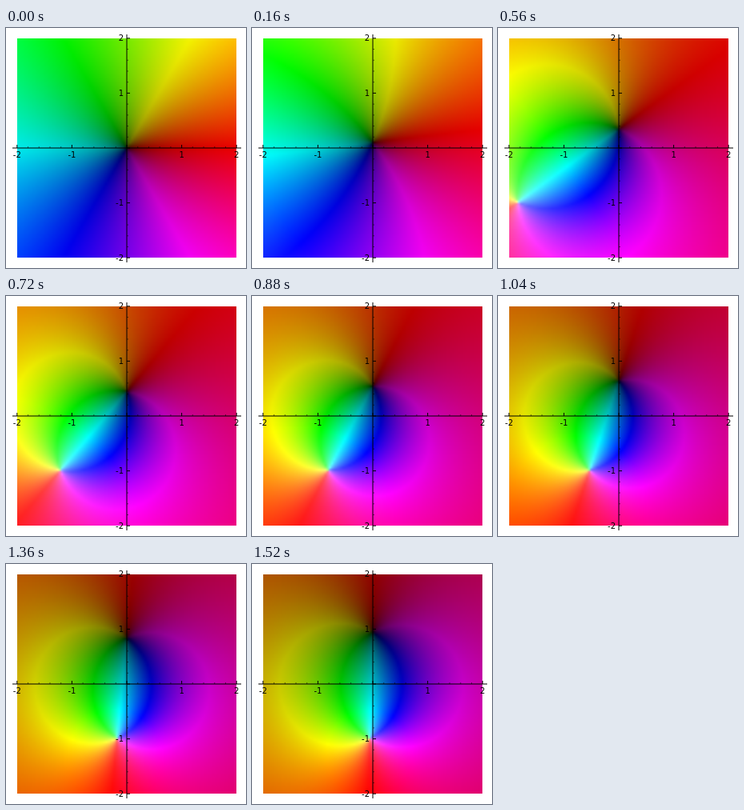
An HTML page with a canvas for the animation above (1.6 s loop, 300 by 300 pixels).

```html
<!DOCTYPE html>
<html lang="en">
<head>
<meta charset="utf-8">
<title>Möbius transformation</title>
<style>
  html, body { margin: 0; overflow: hidden; background: #fff; }
  canvas { display: block; }
</style>
</head>
<body>
<canvas id="stage" width="300" height="300"></canvas>
<script>
const ctx = document.getElementById('stage').getContext('2d');
const CX = 151, CY = 150, UNIT = 68.6;
const STEPS = 20, STEP_MS = 80;

// The function is sampled on a coarse grid and smoothly enlarged.
const GRID = 100;
const plot = document.createElement('canvas');
plot.width = plot.height = GRID;
const plotCtx = plot.getContext('2d');
const image = plotCtx.createImageData(GRID, GRID);

// Domain colouring: the argument gives the hue, the modulus the lightness.
function paintSample(offset, re, im) {
  const r = Math.hypot(re, im);
  const light = Math.atan(Math.log(Math.sqrt(r) + 1)) * 4 / Math.PI - 1;
  const low = Math.max(0, light), high = Math.min(1, 1 + light);
  const hue = Math.atan2(im, re) * 3 / Math.PI + 6;
  for (let c = 0; c < 3; c++) {
    const h = (hue + 6 - 2 * c) % 6;
    const level = Math.min(1, Math.max(0, Math.abs(h - 3) - 1));
    image.data[offset + c] = 255 * (low + level * (high - low));
  }
  image.data[offset + 3] = 255;
}

// f(z) = (z - it) / (tz + 1 - t + it), from the identity to the Cayley map.
function paintMap(t) {
  const coord = i => -2 + 4 * i / (GRID - 1);
  let offset = 0;
  for (let row = 0; row < GRID; row++) {
    const y = -coord(row);
    for (let col = 0; col < GRID; col++, offset += 4) {
      const x = coord(col);
      const a = x, b = y - t;
      const c = t * x + 1 - t, d = t * y + t;
      const n = c * c + d * d + 1e-12;
      paintSample(offset, (a * c + b * d) / n, (b * c - a * d) / n);
    }
  }
  plotCtx.putImageData(image, 0, 0);
  ctx.imageSmoothingQuality = 'high';
  ctx.drawImage(plot, CX - 2 * UNIT, CY - 2 * UNIT, 4 * UNIT, 4 * UNIT);
}

function paintAxes() {
  ctx.fillStyle = '#000';
  ctx.font = '10px "DejaVu Sans", sans-serif';
  ctx.fillRect(8, CY - 0.5, 286, 1);
  ctx.fillRect(CX - 0.5, 8, 1, 285);
  for (let i = -10; i <= 10; i++) {
    const major = i % 5 === 0, size = major ? 4 : 2;
    const pos = i / 5 * UNIT;
    ctx.globalAlpha = major ? 1 : 0.5;
    ctx.fillRect(CX + pos - 0.5, CY - size, 1, size);
    ctx.fillRect(CX, CY - pos - 0.5, size, 1);
    ctx.globalAlpha = 1;
    if (major && i) {
      ctx.textAlign = 'center';
      ctx.fillText(i / 5, CX + pos, 162);
      ctx.textAlign = 'right';
      ctx.fillText(i / 5, 147, CY + 3.6 - pos);
    }
  }
}

let shown = -1;
function frame() {
  const step = Math.floor((performance.now() - start) / STEP_MS) % STEPS;
  if (step !== shown) {
    shown = step;
    ctx.clearRect(0, 0, 300, 300);
    paintMap(step / STEPS);
    paintAxes();
  }
  requestAnimationFrame(frame);
}

const start = performance.now();
frame();
</script>
</body>
</html>
```
